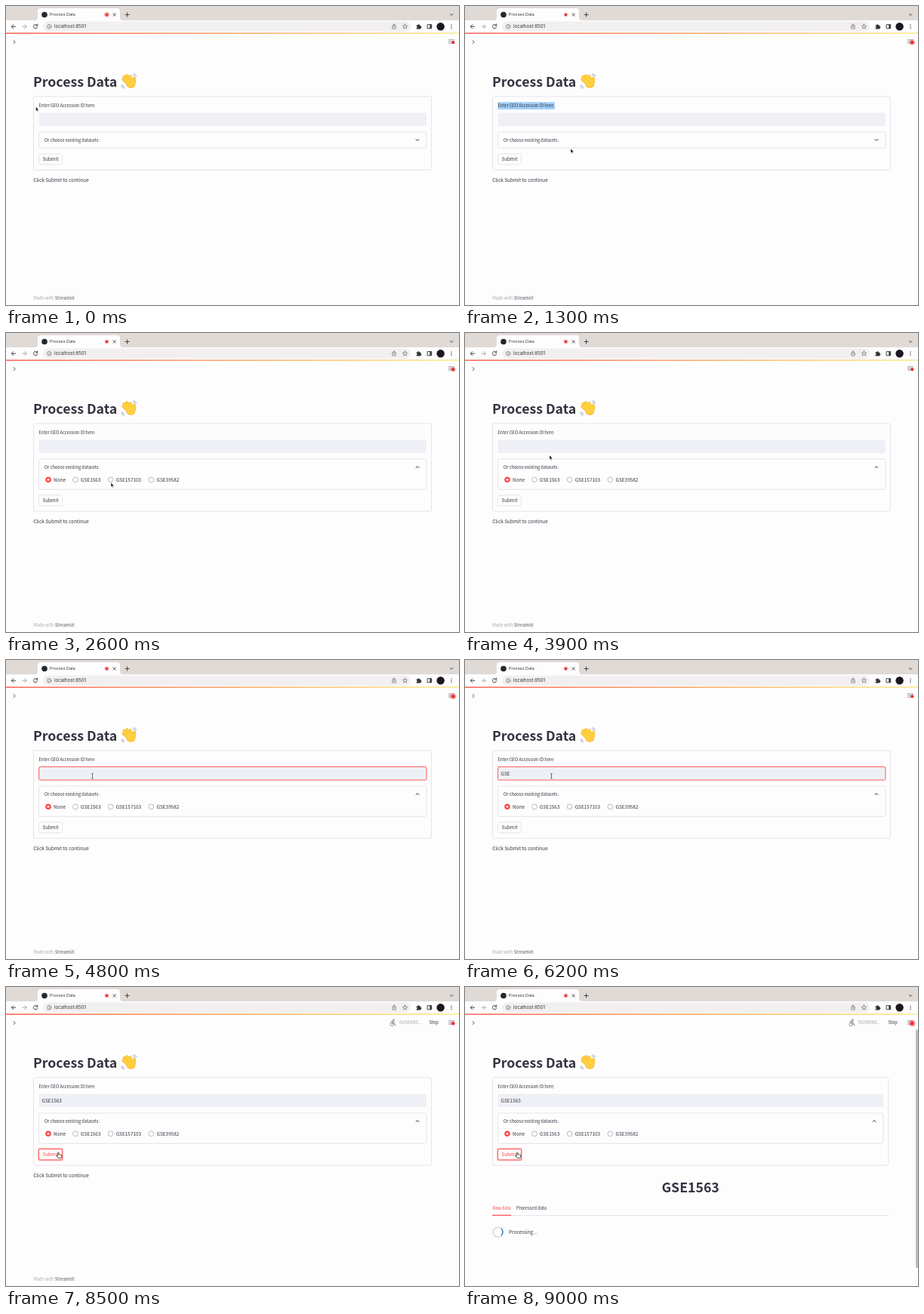
An HTML page that plays this animation: 600 px wide and 396 px high, repeating every 9.1 s.

```html
<!DOCTYPE html>
<html lang="en">
<head>
<meta charset="utf-8">
<title>Process Data</title>
<style>
html, body { margin: 0; width: 100%; height: 100%; overflow: hidden; background: #fefdfe; }
svg { display: block; }
text {
  font: 5.65px "Noto Sans CJK JP", "Noto Sans CJK SC", "Noto Sans CJK", "Noto Sans", sans-serif;
  fill: #31333f; white-space: pre;
}
.body { font-size: 6.45px; }
.big { font-size: 17.7px; font-weight: 700; }
.ui { font-family: Inter, Roboto, sans-serif; font-size: 5.4px; fill: #333; }
.line { fill: none; stroke: #444; stroke-width: 1; stroke-linecap: round; stroke-linejoin: round; }
.box { fill: none; stroke: #dcdde2; stroke-width: .8; }
</style>
</head>
<body>
<svg width="600" height="396" viewBox="0 0 600 396">
  <defs>
    <linearGradient id="bar">
      <stop offset="0" stop-color="#ff5a50"/>
      <stop offset=".5" stop-color="#ffa35c"/>
      <stop offset="1" stop-color="#fff08a"/>
    </linearGradient>
  </defs>
  <rect width="600" height="396" fill="#fefdfe"/>

  <!-- browser window -->
  <rect width="600" height="19" fill="#e0dad7"/>
  <path d="M38 19Q42 19 42 15V7Q42 3 46 3H147Q151 3 151 7V15Q151 19 155 19Z" fill="#fefdfe"/>
  <circle cx="51" cy="11.5" r="3.8" fill="#26282c"/>
  <text class="ui" x="58" y="13.4">Process Data</text>
  <circle cx="133.5" cy="11.4" r="2" fill="#e5342f"/>
  <circle id="tabRing" cx="133.5" cy="11.4" r="2.9" fill="none" stroke="#e5342f" stroke-width=".7"/>
  <path class="line" d="M142 9.9l3.2 3.2m0-3.2l-3.2 3.2M158 11.5h5.2m-2.6-2.6v5.2M588.2 10.6l1.9 1.8 1.9-1.8"/>
  <rect x="49" y="20.4" width="487" height="13.4" rx="6.7" fill="#f2eff0"/>
  <path class="line" d="M12.7 27.2H7.4m2.4-2.5l-2.5 2.5 2.5 2.5"/>
  <path class="line" style="stroke:#aaa" d="M21.8 27.2h5.3m-2.4-2.5l2.5 2.5-2.5 2.5"/>
  <path class="line" d="M41.3 25.6a2.7 2.7 0 1 0 .4 2.2M41.7 24v2h-2"/>
  <g class="line" style="stroke:#666;stroke-width:.7">
    <circle cx="57.2" cy="27.2" r="2.7"/>
    <path d="M57.2 26.9v1.6m0-2.9v.1M512.8 26h-1v4h4.4v-4h-1M514 28.2v-4.3m-1.3 1.2l1.3-1.3 1.3 1.3"/>
    <path d="M528.5 24l.9 2.1 2.2.2-1.7 1.5.5 2.2-1.9-1.2-1.9 1.2.5-2.2-1.7-1.5 2.2-.2z"/>
  </g>
  <text class="ui" x="64" y="29.4" style="font-size:6.2px">localhost:8501</text>
  <path d="M543.6 25.4h1.6a1.2 1.2 0 0 1 2.4 0h1.6v1.6a1.2 1.2 0 0 1 0 2.4v1.2h-5.6v-1.4a1.1 1.1 0 0 0 0-2.2z" fill="#333"/>
  <rect class="line" x="558.5" y="24.6" width="5.2" height="5.2"/>
  <rect x="561.2" y="24.6" width="2.6" height="5.2" fill="#444"/>
  <circle cx="575.6" cy="27.2" r="5.2" fill="#1b1620"/>
  <g fill="#444"><circle cx="590" cy="24.9" r=".7"/><circle cx="590" cy="27.2" r=".7"/><circle cx="590" cy="29.5" r=".7"/></g>
  <rect y="34.8" width="600" height=".7" fill="#e4dfe0"/>
  <rect y="35.5" width="600" height="1.4" fill="url(#bar)"/>

  <!-- page header -->
  <path class="line" d="M10.2 45.7l1.9 1.9-1.9 1.9"/>
  <path d="M586 44.8h8M586 47h8M586 49.2h8" stroke="#9698a0" stroke-width="1"/>
  <circle id="halo" cx="592.3" cy="48.2" fill="#ff2b2b"/>
  <circle cx="592.3" cy="48.2" r="2" fill="#f02626"/>
  <g id="running">
    <g class="line" style="stroke:#777;stroke-width:.8">
      <circle cx="513.3" cy="43.6" r=".8"/>
      <path d="M512.6 45.2l-1 3h3l1.2 3M510 45.6l2.4-.4 2.4 1.4"/>
      <circle cx="511.3" cy="49.3" r="2.3"/>
    </g>
    <text x="521" y="49.3" style="fill:#a3a5ae">RUNNING...</text>
    <text x="560.5" y="49.3">Stop</text>
  </g>

  <text class="big" x="36" y="107.2">Process Data</text>
  <g fill="none" stroke-linecap="round">
    <g stroke="#f2a91f" stroke-width="3.9">
      <path id="hand" d="M163 104L155.3 97.3M164 102L156.4 93.8M166 101L160 92.4M168 101L164.3 93.2M168.5 104Q171 100 169.8 96"/>
      <ellipse cx="165.3" cy="103.4" rx="4" ry="3.4" fill="#f2a91f"/>
    </g>
    <g stroke="#ffcf3f" stroke-width="2.8">
      <use href="#hand" style="stroke-width:2.8"/>
      <path d="M163 104L155.3 97.3M164 102L156.4 93.8M166 101L160 92.4M168 101L164.3 93.2M168.5 104Q171 100 169.8 96"/>
      <ellipse cx="165.3" cy="103.4" rx="4" ry="3.4" fill="#ffcf3f"/>
    </g>
    <path d="M168 91q2.4.6 3.2 2.8M169.3 89.6q2.7.7 3.4 3M154 104.4q.6 2.4 3 3.3M152.7 105.6q.8 2.8 3.4 3.6" stroke="#8c9aa5" stroke-width=".8"/>
  </g>

  <!-- form -->
  <rect id="form" class="box" x="36.5" y="119.9" rx="2"/>
  <rect id="mark" x="43.5" y="127.2" height="9.8" fill="#a3cff8"/>
  <text x="43.5" y="134.3">Enter GEO Accession ID here:</text>
  <rect id="input" x="43.6" y="141.4" height="17.6" rx="1.6" fill="#eef0f5" stroke-width=".9"/>
  <text id="typed" class="body" x="47.5" y="152.6"></text>
  <rect id="expander" class="box" x="43.6" y="167" rx="1.6"/>
  <text id="summary" x="51" y="179.6">Or choose existing datasets:</text>
  <path id="chevron" class="line"/>
  <g id="radios"></g>
  <g id="lower">
    <rect id="glow" x="42.9" y="195.2" width="32.2" height="15.6" rx="2.2" fill="none" stroke="#ff4b4b" stroke-opacity=".5" stroke-width="1.4"/>
    <rect id="button" class="box" x="43.6" y="196" width="30.8" height="14" rx="1.6"/>
    <text id="submit" x="59" y="205.1" text-anchor="middle" style="font-size:6.2px">Submit</text>
    <text id="hint" class="body" x="36.2" y="233.2">Click Submit to continue</text>
  </g>
  <text id="footer" x="36.2" y="388.6" style="fill:#a6a8b0">Made with <tspan font-weight="700" fill="#858790">Streamlit</tspan></text>

  <!-- results -->
  <g id="results">
    <text class="big" x="298.6" y="271.7" text-anchor="middle">GSE1563</text>
    <text x="36.4" y="295" style="fill:#ff4b4b">Raw data</text>
    <text x="68" y="295">Processed data</text>
    <rect x="36" y="302" width="525" height=".9" fill="#e3e4e9"/>
    <rect x="36" y="301.7" width="25" height="1.2" fill="#ff4b4b"/>
    <circle cx="43.6" cy="324.6" r="6.4" fill="none" stroke="#d5d7dc" stroke-width="1.5"/>
    <path id="spin" d="M48.13 320.07A6.4 6.4 0 0 1 48.13 329.13" fill="none" stroke="#3c82d0" stroke-width="1.5"/>
    <text class="body" x="58" y="326.9">Processing...</text>
    <rect x="597" y="56.5" width="3" height="315.5" rx="1" fill="#bdbcbf"/>
  </g>

  <!-- pointers, each with its hot spot at 0,0 -->
  <g id="pointer">
    <path d="M0 0V5.6L1.3 4.4 2.2 6.4 3.1 6 2.2 4.1H4z" fill="#111" stroke="#fff" stroke-width=".4"/>
    <path d="M-1.2-3.2Q0-3.2 0-2.4Q0-3.2 1.2-3.2M0-2.6V3M-1.2 3.6Q0 3.6 0 2.8Q0 3.6 1.2 3.6" fill="none" stroke="#333" stroke-width=".7"/>
    <path d="M-.8 4.6V.6Q0-.4.7.6V2.8Q1.6 2.2 2 3Q2.9 2.5 3.2 3.3Q4.3 3 4.3 4.2Q4.4 6 3.4 7.6H-.2L-2.5 4.8Q-2.6 3.6-1.6 4z" fill="#fff" stroke="#222" stroke-width=".8" stroke-linejoin="round"/>
  </g>
</svg>
<script>
const LOOP = 9100, RED = "#ff4b4b", INK = "#31333f", EDGE = "#dcdde2";
const $ = id => document.getElementById(id);
const set = (id, attrs) => { for (const k in attrs) $(id).setAttribute(k, attrs[k]); };
const show = (id, on) => { $(id).style.display = on ? "" : "none"; };
const clamp = (v, lo = 0, hi = 1) => Math.min(hi, Math.max(lo, v));

// time, x, y of the pointer
const PATH = [
  [0, 39.5, 133.5], [300, 42, 132], [800, 118, 134], [1000, 135, 139], [1100, 139, 160],
  [1300, 140, 189], [1600, 141, 181], [2100, 141, 181], [2500, 139, 198.5], [3200, 139, 197.5],
  [3600, 116, 177], [3900, 112, 162], [4300, 113, 155], [4700, 114.5, 153.5], [7000, 114.5, 153.5],
  [7300, 108, 159], [7500, 89, 175], [7700, 81.5, 183.5], [8000, 69.5, 219], [LOOP, 69.5, 219]
];
const KEYS = [5500, 5700, 5950, 6400, 6600, 6750, 6950];

$("radios").innerHTML = [["None", 56], ["GSE1563", 92], ["GSE157103", 138.6], ["GSE39582", 192.4]].map(([name, x], i) =>
  (i ? `<circle cx="${x}" cy="194.3" r="3.4" fill="#fff" stroke="#a5a7ae" stroke-width=".8"/>`
     : `<circle cx="${x}" cy="194.3" r="3.8" fill="${RED}"/><circle cx="${x}" cy="194.3" r="1.4" fill="#fff"/>`) +
  `<text class="body" x="${x + 7.1}" y="196.6">${name}</text>`).join("");

function pointerAt(t) {
  const i = Math.max(1, PATH.findIndex(p => p[0] >= t));
  const [t0, x0, y0] = PATH[i - 1], [t1, x1, y1] = PATH[i], u = (t - t0) / (t1 - t0);
  return [x0 + (x1 - x0) * u, y0 + (y1 - y0) * u];
}

function draw(t) {
  const [x, y] = pointerAt(t);
  const u = clamp((t - 1850) / 400), open = u * u * (3 - 2 * u), shift = 18.8 * open;
  const done = t >= 8600, right = done ? 560.7 : 563.6, inner = right - 6.7;
  const focused = t >= 4600 && t < 8300, pressed = t >= 8300;
  const onInput = y > 141 && y < 159, onSummary = y > 167 && y < 188, onSubmit = t > 7800 && y > 214;

  const pulse = Math.sin(Math.PI * t / 2000) ** 2;
  set("halo", { r: 2 + 1.9 * pulse, opacity: .55 * pulse });
  set("tabRing", { opacity: t < 3000 ? .45 + .4 * Math.cos(Math.PI * t / 1000) : .4 });

  set("form", { width: right - 36.5, height: 97.4 + shift });
  set("mark", { width: t < 1900 ? clamp(x - 43.5, 0, 75.5) : 0 });
  set("input", { width: inner - 43.6, stroke: focused ? RED : "none" });
  $("typed").textContent = "GSE1563".slice(0, KEYS.filter(k => k <= t).length);
  set("expander", { width: inner - 43.6, height: 21 + 19.2 * open });
  $("summary").style.fill = $("chevron").style.stroke = onSummary ? RED : INK;
  const tip = 1 - 2 * open;
  set("chevron", { d: `M${inner - 13.9} ${177.5 - tip}l2 ${2 * tip} 2 ${-2 * tip}` });
  set("radios", { opacity: open });

  set("lower", { transform: `translate(0 ${shift})` });
  show("glow", pressed);
  $("button").style.stroke = onSubmit ? RED : EDGE;
  $("submit").style.fill = onSubmit ? RED : INK;
  show("hint", !done);
  show("footer", !done);
  show("results", done);
  show("running", t >= 8400);
  set("spin", { transform: `rotate(${(t - 9000) * .48} 43.6 324.6)` });

  const shape = onSummary || onSubmit ? 2 : onInput ? 1 : 0;
  [...$("pointer").children].forEach((p, i) => { p.style.display = i === shape ? "" : "none"; });
  set("pointer", { transform: `translate(${x} ${y})` });
}

const start = performance.now();
function tick() {
  const t = (performance.now() - start) % LOOP;
  draw(Math.floor(t / 100) * 100);
  requestAnimationFrame(tick);
}
tick();
</script>
</body>
</html>
```
